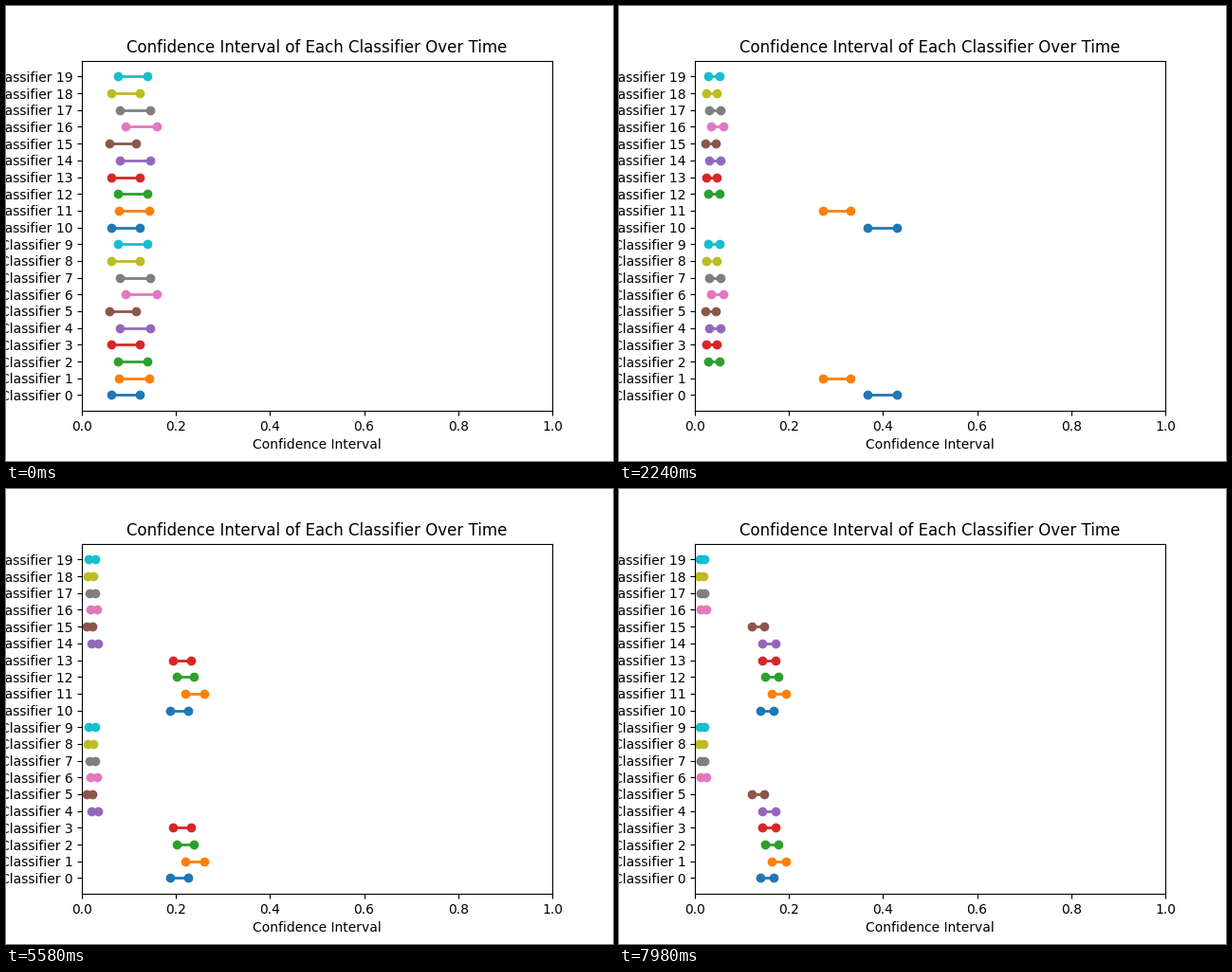
Animation of 640 by 480 pixels, one loop 8000 ms. Source, as a matplotlib script:

```python
import numpy as np
import matplotlib.pyplot as plt
from matplotlib.animation import FuncAnimation

FRAMES, INTERVAL = 400, 20
STEP = 15      # samples arriving per frame
Z = 3.2905     # 99.9 % confidence

# Hits after the first 1000 shuffled samples, then the size of each
# single-class block that streams in afterwards, one class at a time.
start = np.array([88, 107, 104, 88, 109, 82, 122, 108, 88, 104])
blocks = np.array([980, 1135, 1032, 1010, 982, 892, 958, 1028, 974, 1009])
block_start = np.cumsum(blocks) - blocks


def wilson(hits, n):
    p = hits / n
    scale = 1 + Z**2 / n
    center = (p + Z**2 / (2 * n)) / scale
    half = Z / scale * np.sqrt(p * (1 - p) / n + Z**2 / (4 * n**2))
    return center - half, center + half


fig, ax = plt.subplots(figsize=(6.4, 4.8), dpi=100)
ax.set_xlim(0, 1)
ax.set_ylim(-0.95, 19.95)
ax.set_yticks(range(20), [f"Classifier {i}" for i in range(20)])
ax.set_xlabel("Confidence Interval")
ax.set_title("Confidence Interval of Each Classifier Over Time")

# Each line holds two bars: classifier c and its twin c + 10.
lines = [
    ax.plot([0, 0, np.nan, 0, 0], [c, c, np.nan, c + 10, c + 10],
            "o-", color=f"C{c}", lw=2)[0]
    for c in range(10)
]


def update(frame):
    added = STEP * frame
    hits = start + np.clip(added - block_start, 0, blocks)
    low, high = wilson(hits, start.sum() + added)
    for line, lo, hi in zip(lines, low, high):
        line.set_xdata([lo, hi, np.nan, lo, hi])
    return lines


anim = FuncAnimation(fig, update, frames=FRAMES, interval=INTERVAL,
                     repeat=True, repeat_delay=0)
plt.show()
```
